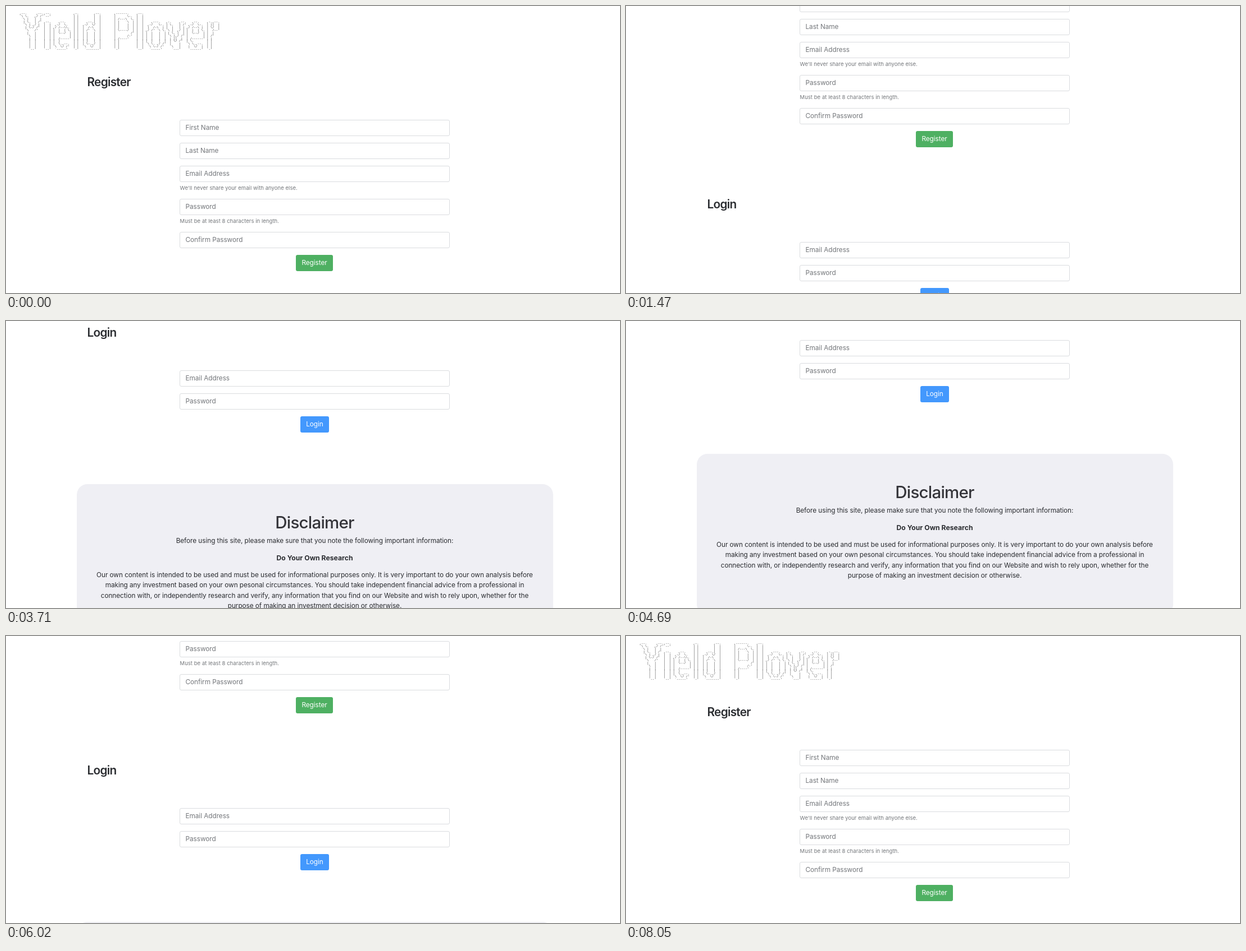
Write an HTML page that moves like this. It is 1093 px wide and 512 px high and loops after 8.33 s.

```html
<!DOCTYPE html>
<html lang="en">
<head>
<meta charset="utf-8">
<style>
html, body { margin: 0; width: 100%; height: 100%; overflow: hidden; background: #fff; }
body { font: 11.8px/18.33px Inter, sans-serif; letter-spacing: -.005em; color: #2b2d31; }
#page { position: relative; width: 1093px; height: 1132px; }
#page > * { position: absolute; margin: 0; box-sizing: border-box; white-space: pre; }
#banner { left: 24px; top: 7px; font: 5.5px/4.95px "Liberation Mono", monospace; letter-spacing: 0; color: #333; }
.title { left: 144.5px; height: 26px; font-size: 20.8px; line-height: 26px; font-weight: 600; letter-spacing: -.035em; }
.field { left: 309px; width: 481px; height: 29px; padding-left: 9.5px; line-height: 27px; border: 1px solid #dadcdf; border-radius: 3px; color: #74777b; }
.help { left: 309.5px; height: 14px; font-size: 9.5px; line-height: 14px; letter-spacing: .005em; color: #74777b; }
.button { height: 29px; line-height: 29px; border-radius: 3px; color: #fff; text-align: center; }
.green { left: 516px; width: 66px; background: #4eb062; }
.blue { left: 524px; width: 51px; background: #4398fd; }
.panel { left: 125.5px; width: 848px; height: 287px; border-radius: 19px; background: #efeff4; }
.line { left: 125.5px; width: 848px; height: 18px; line-height: 18px; text-align: center; }
.big { height: 36px; font-size: 29.5px; line-height: 36px; font-weight: 500; letter-spacing: -.026em; color: #35353a; }
.bold { font-size: 12.2px; font-weight: 700; letter-spacing: .002em; }
</style>
</head>
<body>
<div id="page"><pre id="banner"></pre></div>
<script>
const page = document.getElementById('page');

function add(className, top, text = '') {
  const el = document.createElement('div');
  el.className = className;
  el.style.top = top + 'px';
  el.textContent = text;
  page.append(el);
}

add('title', 123, 'Register');
add('field', 203, 'First Name');
add('field', 244, 'Last Name');
add('field', 285, 'Email Address');
add('help', 318, "We'll never share your email with anyone else.");
add('field', 344, 'Password');
add('help', 377, 'Must be at least 8 characters in length.');
add('field', 403, 'Confirm Password');
add('button green', 444, 'Register');

add('title', 562, 'Login');
add('field', 642, 'Email Address');
add('field', 683, 'Password');
add('button blue', 724, 'Login');

add('panel', 845);
add('line big', 895, 'Disclaimer');
add('line', 937, 'Before using this site, please make sure that you note the following important information:');
add('line bold', 967.5, 'Do Your Own Research');
[
  'Our own content is intended to be used and must be used for informational purposes only. It is very important to do your own analysis before',
  'making any investment based on your own pesonal circumstances. You should take independent financial advice from a professional in',
  'connection with, or independently research and verify, any information that you find on our Website and wish to rely upon, whether for the',
  'purpose of making an investment decision or otherwise.'
].forEach((text, i) => add('line', 998 + Math.round(i * 18.33), text));

// Traces the outline of a word in ASCII, one character per grid cell.
function asciiOutline(text, cols, rows) {
  const cellW = 3.3, cellH = 3.2;
  const canvas = document.createElement('canvas');
  canvas.width = 400;
  canvas.height = 64;
  const ctx = canvas.getContext('2d');
  ctx.font = 'bold 62px "Liberation Sans", sans-serif';
  ctx.fillText(text, 2, 48);
  const { data } = ctx.getImageData(0, 0, 400, 64);
  const filled = (c, r) => data[(Math.round(r * cellH) * 400 + Math.round(c * cellW)) * 4 + 3] > 127 ? 1 : 0;
  const glyphs = " '`-.|//,\\|\\-\\/ ";
  let out = '';
  for (let r = 0; r < rows; r++) {
    for (let c = 0; c < cols; c++) {
      out += glyphs[filled(c, r) + 2 * filled(c + 1, r) + 4 * filled(c, r + 1) + 8 * filled(c + 1, r + 1)];
    }
    out += '\n';
  }
  return out;
}
document.getElementById('banner').textContent = asciiOutline('Yield Plover', 112, 16);

const LOOP = 8330, STEP = 70;
// Scroll bursts: first step, last step, resting position.
const bursts = [
  [490, 700, 50], [910, 1050, 120], [1330, 1470, 221], [1750, 1890, 300],
  [2170, 2310, 331], [2450, 2730, 447], [2870, 3150, 480], [3290, 3570, 536],
  [3710, 3850, 605], [4130, 4200, 607], [4340, 4410, 608], [4760, 5040, 505],
  [5180, 5460, 460], [5600, 6230, 300], [6370, 6650, 148], [6790, 7140, 50],
  [7420, 7630, 2], [7840, 7910, 1], [8050, 8050, 0]
];
const ease = p => p * p * (3 - 2 * p);

function scrollAt(t) {
  let y = 0;
  for (const [start, end, target] of bursts) {
    if (t < start) break;
    const steps = (end - start) / STEP + 1;
    const done = Math.floor((t - start) / STEP) + 1;
    y += (target - y) * ease(Math.min(1, done / steps));
  }
  return Math.round(y);
}

function draw() {
  page.style.transform = `translateY(${-scrollAt(performance.now() % LOOP)}px)`;
  requestAnimationFrame(draw);
}
draw();
</script>
</body>
</html>
```
